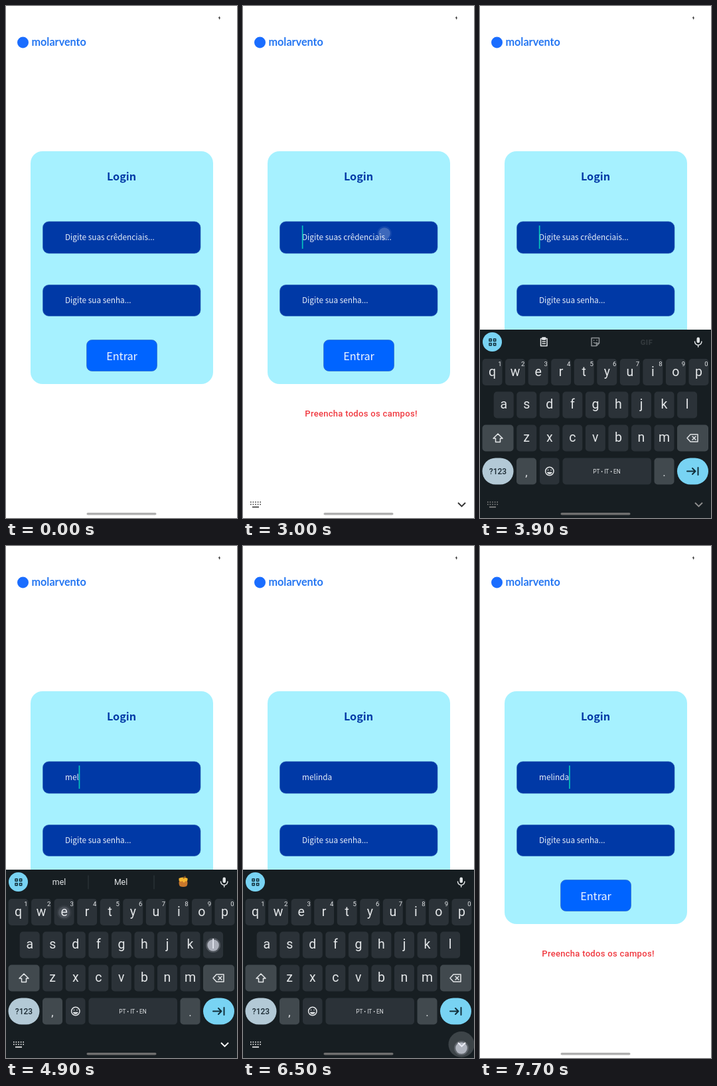
Recreate the animation shown at these times as an HTML page. Size 348 px wide and 772 px high, loop 8 s.

```html
<!DOCTYPE html>
<html lang="pt">
<head>
<meta charset="utf-8">
<title>Login</title>
<style>
  html, body { margin: 0; width: 100%; height: 100%; overflow: hidden; background: #fff; }
  svg { display: block; width: 100vw; height: 100vh; }
  text { white-space: pre; }
  .form { font-family: "Noto Sans CJK JP", "Noto Sans CJK SC", sans-serif; }
  .kb, .error { font-family: Roboto, sans-serif; }
  .mid { text-anchor: middle; }
  .line { fill: none; stroke: #e3e6e8; stroke-width: 1.5; stroke-linecap: round; stroke-linejoin: round; }
</style>
</head>
<body>
<svg viewBox="0 0 348 772">
  <path d="M322 15l-2.2 3.2h1.5l-.4 2.8 2.2-3.4h-1.5z" fill="#111"/>
  <circle cx="25.500" cy="55" r="8.500" fill="#1a6dff"/>
  <text x="38.500" y="60" font-family="Lato, sans-serif" font-weight="700" font-size="16.200" fill="#2476f2">molarvento</text>

  <g class="form">
    <rect x="37" y="219" width="275" height="351" rx="18" fill="#a6f1ff"/>
    <text class="mid" x="174" y="263" font-size="16.200" font-weight="700" fill="#0039a6">Login</text>
    <g fill="#0039a6" stroke="#2a62b8" stroke-width=".6">
      <rect x="55.500" y="325" width="237.500" height="48" rx="9"/>
      <rect x="55.500" y="420.500" width="237.500" height="47" rx="9"/>
      <rect x="121.500" y="503.500" width="106" height="47" rx="8" fill="#0064ff"/>
    </g>
    <g font-size="11.800" fill="#e8effa">
      <text id="user" x="89" y="353"></text>
      <text x="89" y="448">Digite sua senha...</text>
    </g>
    <text class="mid" x="174.500" y="533.500" font-size="16.200" fill="#f2f7ff">Entrar</text>
  </g>
  <rect id="caret" y="331" width="1.700" height="35" fill="#06c3bd"/>
  <text id="error" class="error mid" x="178" y="619" font-size="13" font-weight="500" letter-spacing=".3" fill="#f0383f">Preencha todos os campos!</text>

  <g id="kb" class="kb"></g>
  <circle id="ripple" cx="329" cy="751.500" fill="#42494d"/>
  <g id="nav" fill="none" stroke-width="1.600">
    <path d="M11 748h16M11 751.500h16" stroke-dasharray="1.600 2"/>
    <path d="M14 755.500h10"/>
    <path d="M324 749l5.500 5.500 5.500-5.500" stroke-width="1.900"/>
  </g>
  <rect id="pill" x="121.500" y="764" width="105" height="3.600" rx="1.800"/>
  <g id="dots"></g>
</svg>
<script>
const $ = id => document.getElementById(id);
const set = (id, attrs) => { for (const k in attrs) $(id).setAttribute(k, attrs[k]); };
const clamp = v => Math.max(0, Math.min(1, v));
const ramp = (t, a, b) => clamp((t - a) / (b - a));
const ease = p => 1 - (1 - p) ** 3;
const mix = (a, b, p) => Math.round(a + (b - a) * p);

const PITCH = 34.55;
const rows = [["qwertyuiop", 18.5, 532], ["asdfghjkl", 35.7, 581.5], ["zxcvbnm", 70.2, 631.500]];
const pos = {};

const key = (x, y, w, fill = "#2b3238", rx = 5) =>
  `<rect x="${x}" y="${y}" width="${w}" height="40" rx="${rx}" fill="${fill}"/>`;
const label = (x, y, size, str, extra = "") =>
  `<text class="mid" x="${x}" y="${y}" font-size="${size}" ${extra}>${str}</text>`;
const icon = (d, extra = "") => `<path class="line" d="${d}" ${extra}/>`;

function keyboard() {
  let s = `<rect y="488" width="348" height="284" fill="#171e22"/><g fill="#e3e6e8">`;
  rows.forEach(([chars, x0, y], r) => [...chars].forEach((c, i) => {
    const x = x0 + i * PITCH;
    pos[c] = [x, y + 20.500];
    s += key(x - 15, y, 30) + label(x, y + 25.500, 19.500, c);
    if (!r) s += label(x + 11.500, y + 10.500, 9.500, (i + 1) % 10);
  }));
  const grey = "#41494e", blue = "#78d3f3";
  s += key(3.500, 631.500, 47, grey) + key(297, 631.500, 47, grey)
    + key(3.500, 681.500, 47, "#b3c9d6", 20) + key(55, 681.500, 30, grey)
    + key(90, 681.500, 29.500) + key(124.500, 681.500, 133.500)
    + key(262.500, 681.500, 30, grey) + key(297, 681.500, 47, blue, 20)
    + label(27, 705.500, 12, "?123", `font-weight="500" fill="#1b2a33"`)
    + label(70, 709, 17, ",") + label(277.500, 709, 17, ".")
    + label(191, 704.500, 8.300, "PT • IT • EN")
    + icon("M27 645l7 7h-3.500v5.500h-7v-5.500h-3.500z")
    + icon("M317 646h11v11h-11l-5-5.500zM320 649l5 5M325 649l-5 5")
    + icon("M111 701.500a6.200 6.200 0 1 1-12.400 0a6.200 6.200 0 1 1 12.400 0zM102.500 699.500v.2M107 699.500v.2M101.700 703.500q3 3.500 6.200 0z")
    + icon("M312 701.500h12M320 697l4.500 4.500-4.500 4.500M328.500 696v11", `style="stroke:#12303c;stroke-width:2"`)
    + `<circle cx="18.500" cy="506.500" r="14.500" fill="${blue}"/>`
    + icon("M14 502h3.200v3.200h-3.200zM20.500 502h3.200v3.200h-3.200zM14 508.500h3.200v3.200h-3.200zM20.500 508.500h3.200v3.200h-3.200z", `style="stroke:#12303c"`)
    + `<rect x="326.500" y="499.500" width="4.500" height="8.500" rx="2.200"/>` + icon("M323.500 506a5.200 5.200 0 0 0 10.400 0M328.700 511.500v2.500")
    + `<g id="tool0">${icon("M91.500 501.500h9.500v11h-9.500zM94 500h4.500v3h-4.500zM94 506h4.500M94 509h4.500")}</g>`
    + `<g id="tool1">${icon("M168 500.500h11.500v8l-4 4h-7.500zM179.500 508.500h-4v4M171.500 504v.2M176 504v.2M171.500 507.500q2 1.500 4 0")}</g>`
    + `<g id="tool2">${label(251, 510.500, 11, "GIF", `font-weight="900" letter-spacing=".5"`)}</g>`
    + `<g id="tips">` + icon("M124 497v20M223 497v20", `style="stroke:#333a3f;stroke-width:1"`)
    + label(80, 511, 12.300, "", `id="tip0"`) + label(173, 511, 12.300, "", `id="tip1"`)
    + `<g id="pot"><path d="M262 503h10q3 5.500 0 10q-5 2-10 0q-3-4.500 0-10z" fill="#c9782c"/>
       <path d="M260.500 501q6.500-3 13 0v3q-2 3-3.500 1q-2 5-4 0q-3 2-5.500-.500z" fill="#f7b731"/>
       <path d="M267 501l3.500-3" stroke="#8a5524" stroke-width="2"/></g></g>`;
  return s + "</g>";
}
$("kb").innerHTML = keyboard();

// Typed letters and when each one lands
const typed = [[4420, "m"], [4650, "e"], [4840, "l"], [5100, "i"], [5300, "n"], [5450, "d"], [5600, "a"]];

// Finger contacts: start, end, x, y
const taps = [[1740, 1960, 181, 521], [2740, 2880, 213, 343], [6400, 6570, 329, 757],
  ...typed.map(([t, c]) => [t - 20, t + 100, ...pos[c]])];
$("dots").innerHTML = taps.map(([, , x, y]) =>
  `<g transform="translate(${x} ${y})" fill="#e4e6f4"><circle r="11" opacity=".2"/><circle r="8.800" opacity=".62"/></g>`).join("");
const dots = [...$("dots").children];

function draw(t) {
  const done = typed.filter(([at]) => t >= at);
  const word = done.map(([, c]) => c).join("");
  const user = $("user");
  user.textContent = word || "Digite suas crêdenciais...";

  const since = done.length ? done[done.length - 1][0] : 2850;
  const caretOn = t >= 2850 && (t - since) % 1000 < 500;
  set("caret", { x: 88.800 + (word ? user.getComputedTextLength() : 0), opacity: +caretOn });
  set("error", { opacity: +(t >= 2000) });

  const open = ease(ramp(t, 3020, 3400)) * (1 - ramp(t, 6600, 6900) ** 2);
  set("kb", { transform: `translate(0 ${284 * (1 - open)})` });

  const tips = word && t < 6000;
  set("tips", { opacity: tips ? 1 : 0 });
  $("tip0").textContent = word;
  $("tip1").textContent = word && word[0].toUpperCase() + word.slice(1);
  set("pot", { opacity: +(word === "mel") });
  for (let i = 0; i < 3; i++)
    set("tool" + i, { opacity: word ? 0 : ramp(t, 3550 + i * 150, 3850 + i * 200) });

  const tone = mix(51, 255, ramp(t, 3550, 4350));
  set("nav", { stroke: `rgb(${tone},${tone},${tone})`, opacity: t < 6900 ? ramp(t, 2900, 3000) : 0 });
  const bar = mix(176, 110, open);
  set("pill", { fill: `rgb(${bar},${bar},${bar})` });
  set("ripple", { r: 19.500 * ease(ramp(t, 6400, 6500)), opacity: .9 * (1 - ramp(t, 6560, 6720)) });

  taps.forEach(([a, b], i) =>
    dots[i].setAttribute("opacity", t < a ? 0 : 1 - ramp(t, b, b + 200)));
}

function frame() {
  draw(performance.now() % 8000);
  requestAnimationFrame(frame);
}
frame();
</script>
</body>
</html>
```
